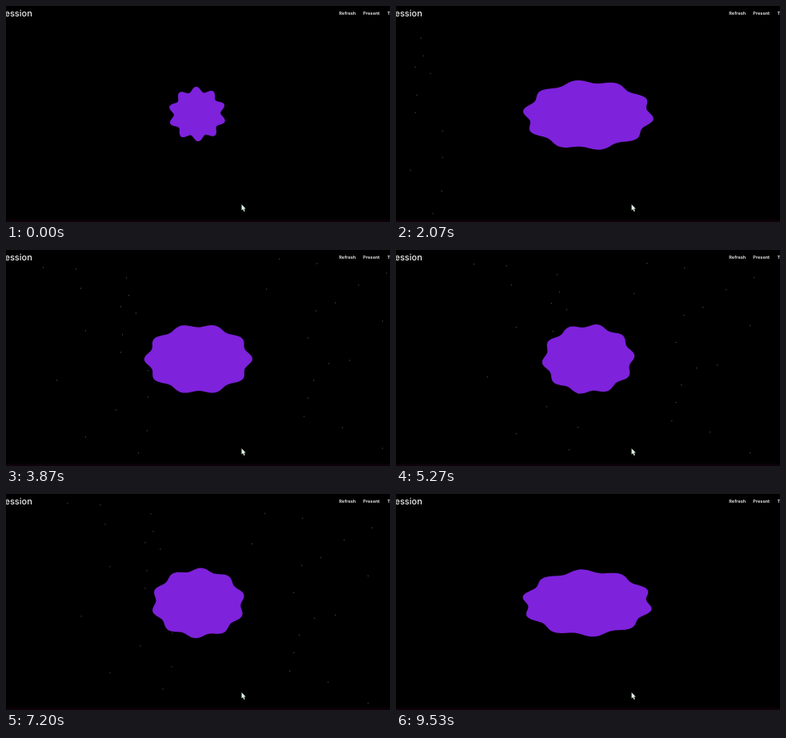
An HTML page for the animation above (9590 ms loop, 480x270 px).

```html
<!DOCTYPE html>
<html lang="en">
<head>
<meta charset="utf-8">
<style>
  html, body { margin: 0; width: 100%; height: 100%; overflow: hidden; background: #000; }
  svg { display: block; width: 100vw; height: 100vh; }
  text { fill: #eee; font-family: Inter, sans-serif; font-weight: 500; text-rendering: geometricPrecision; }
  .title { font-size: 11px; text-anchor: end; }
  .menu text { font-size: 5.6px; font-weight: 600; }
  .stars { fill: #666; }
</style>
</head>
<body>
<svg viewBox="0 0 480 270">
  <rect width="480" height="270"/>
  <rect y="267" width="480" height="3" fill="#0d0208"/>
  <g id="left" class="stars"></g>
  <g id="right" class="stars"></g>
  <path id="blob" fill="#7e22dc"/>
  <text class="title" x="32.8" y="13">Session</text>
  <g class="menu">
    <text x="416.3" y="11">Refresh</text>
    <text x="446.3" y="11">Present</text>
    <text x="476.5" y="11">T</text>
  </g>
  <path d="M294.5 248v7.6l1.7-1.5 1.2 2.8 1.3-.6-1.2-2.7h2.2z" fill="#e0f5e0"/>
</svg>
<script>
const LOOP = 9.59, LOBES = 10, STEPS = 240;
const $ = id => document.getElementById(id);

// Smooth step from 0 to 1 between two times.
function ease(t, start, end) {
  const u = Math.min(1, Math.max(0, (t - start) / (end - start)));
  return u * u * (3 - 2 * u);
}

let seed = 7;
function random() {
  seed = (seed * 16807) % 2147483647;
  return seed / 2147483647;
}

// Stars get sparser towards the bottom.
function addStars(id, count, x, width) {
  for (let i = 0; i < count; i++) {
    const star = document.createElementNS('http://www.w3.org/2000/svg', 'rect');
    star.setAttribute('x', Math.round(x + width * random()));
    star.setAttribute('y', Math.round(14 + 250 * ((i + random()) / count) ** 1.4));
    star.setAttribute('width', 1);
    star.setAttribute('height', 1);
    $(id).append(star);
  }
}
addStars('left', 17, 97, 142);
addStars('right', 16, 287, 171);

// The blob pops open, narrows while the stars drift in, then widens again.
function drawBlob(t) {
  const open = ease(t, 1.3, 1.95), narrow = ease(t, 2, 5.3), widen = ease(t, 7.1, 8.1);
  const cx = 239 + 1.4 * (open - widen);
  const cy = 135 + 1.3 * open;
  const rx = 36 + 46 * open + 24 * (widen - narrow);
  const ry = 34.2 + 9.8 * open - 1.8 * widen;
  const ripple = 0.095 - 0.047 * open;
  const turn = (15.8 - 4.17 * t) * Math.PI / 180;
  const points = [];
  for (let i = 0; i < STEPS; i++) {
    const a = i / STEPS * 2 * Math.PI;
    const r = 1 - ripple + ripple * Math.cos(LOBES * (a - turn));
    points.push(`${(cx + rx * r * Math.cos(a)).toFixed(2)} ${(cy + ry * r * Math.sin(a)).toFixed(2)}`);
  }
  $('blob').setAttribute('d', `M${points.join('L')}Z`);
}

// Both halves glide to the middle, tilt slightly, then fly apart.
function drawStars(t) {
  const exit = 260 * Math.max(0, (t - 6.3) / 1.7) ** 4;
  const left = 14 - 9.4 * Math.max(0, 6.5 - t) ** 2 - 14 * ease(t, 5.3, 6.5) - exit;
  const right = 117 * Math.exp((2.8 - t) / 0.89) - 7 + 0.8 * exit;
  $('left').setAttribute('transform', `translate(${left} ${-3 * (t - 5)})`);
  $('right').setAttribute('transform', `translate(${right} ${4 * (t - 5)})`);
}

function draw() {
  const t = performance.now() / 1000 % LOOP;
  drawBlob(t);
  drawStars(t);
  requestAnimationFrame(draw);
}
draw();
</script>
</body>
</html>
```
